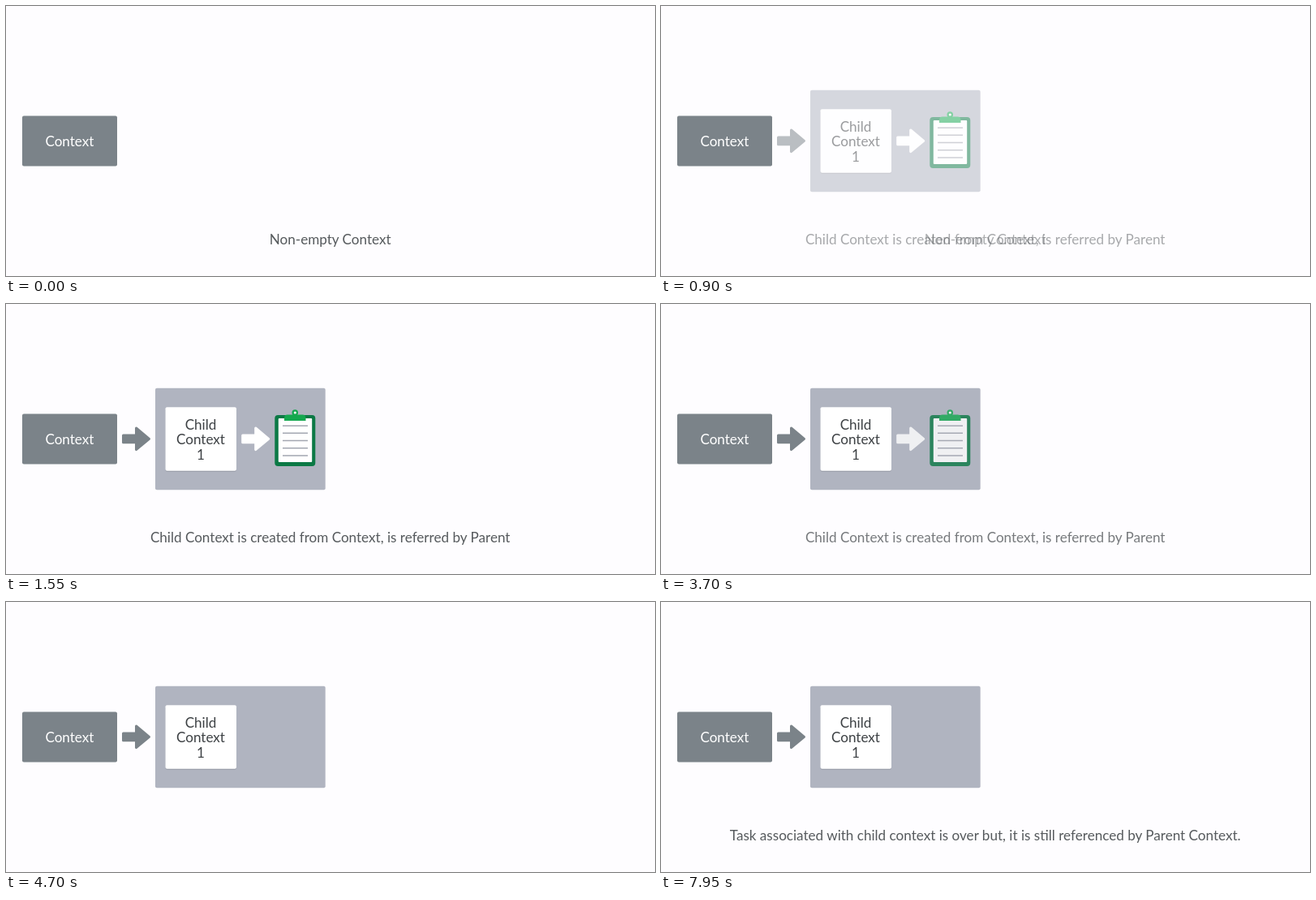
An HTML page for the animation above (8000 ms loop, 800 by 333 pixels).

```html
<!DOCTYPE html>
<html lang="en">
<head>
<meta charset="utf-8">
<title>Context flow</title>
<style>
  html, body { margin: 0; width: 100%; height: 100%; overflow: hidden; background: #fefdff; }
  svg { display: block; width: 100vw; height: 100vh; }
  text { font: 17.1px Lato, sans-serif; text-anchor: middle; }
  .caption { fill: #565a5d; }
  .child { fill: #3d4144; }
</style>
</head>
<body>
<svg viewBox="0 0 800 333">
  <defs>
    <path id="arrow" stroke-width="3" stroke-linejoin="round"
      d="M144.5 162H160.5V153L176.5 166.3L160.5 179.6V170.8H144.5Z"/>
  </defs>

  <rect x="20" y="135.5" width="117" height="62" rx="2" fill="#7b8389"/>
  <text x="78.4" y="173" fill="#fff">Context</text>

  <g id="branch">
    <use href="#arrow" fill="#7b8389" stroke="#7b8389"/>
    <rect x="184" y="103.7" width="209.7" height="125.5" rx="2" fill="#b0b4c0"/>
    <rect x="196.5" y="128.3" width="87.5" height="78.4" rx="2" fill="#969aa5"/>
    <rect x="196.5" y="127.3" width="87.5" height="78.5" rx="2" fill="#fff"/>
    <text class="child" x="240" y="154.5">Child</text>
    <text class="child" x="240" y="173">Context</text>
    <text class="child" x="240" y="191.5">1</text>

    <g id="task">
      <use href="#arrow" x="147.2" fill="#fff" stroke="#fff"/>
      <rect x="331.3" y="137" width="50" height="63" rx="4" fill="#0b7945"/>
      <rect x="335.8" y="141" width="41.4" height="54" rx="1" fill="#fff"/>
      <path d="M341 150.2h31M341 159.3h31M341 168.5h31M341 177.8h31M341 187h31"
        stroke="#a3a7b1" stroke-width="1.5"/>
      <path d="M343 144V140.5Q343 136.5 347 136.5H365.5Q369.5 136.5 369.5 140.5V144Z" fill="#14a84f"/>
      <circle cx="356.3" cy="134" r="2.7" fill="#fefdff" stroke="#14a84f" stroke-width="2.2"/>
    </g>
  </g>

  <text id="intro" class="caption" x="399.7" y="293.5">Non-empty Context</text>
  <text id="created" class="caption" x="399.7" y="293.5">Child Context is created from Context, is referred by Parent</text>
  <text id="over" class="caption" x="399.7" y="293.5">Task associated with child context is over but, it is still referenced by Parent Context.</text>
</svg>
<script>
  const LOOP = 8000;
  const ramp = (t, start, end) => Math.min(1, Math.max(0, (t - start) / (end - start)));
  const setOpacity = (id, value) => document.getElementById(id).setAttribute("opacity", value.toFixed(3));

  function draw(time) {
    const t = time % LOOP;
    const appear = ramp(t, 480, 1300);
    const leave = 1 - ramp(t, 3490, 4560);

    setOpacity("branch", appear);
    setOpacity("task", leave);
    setOpacity("intro", 1 - appear);
    setOpacity("created", appear * leave);
    setOpacity("over", ramp(t, 6900, 7800));
  }

  let origin = null;
  function tick(now) {
    origin ??= now;
    draw(now - origin);
    requestAnimationFrame(tick);
  }

  draw(0);
  requestAnimationFrame(tick);
</script>
</body>
</html>
```
